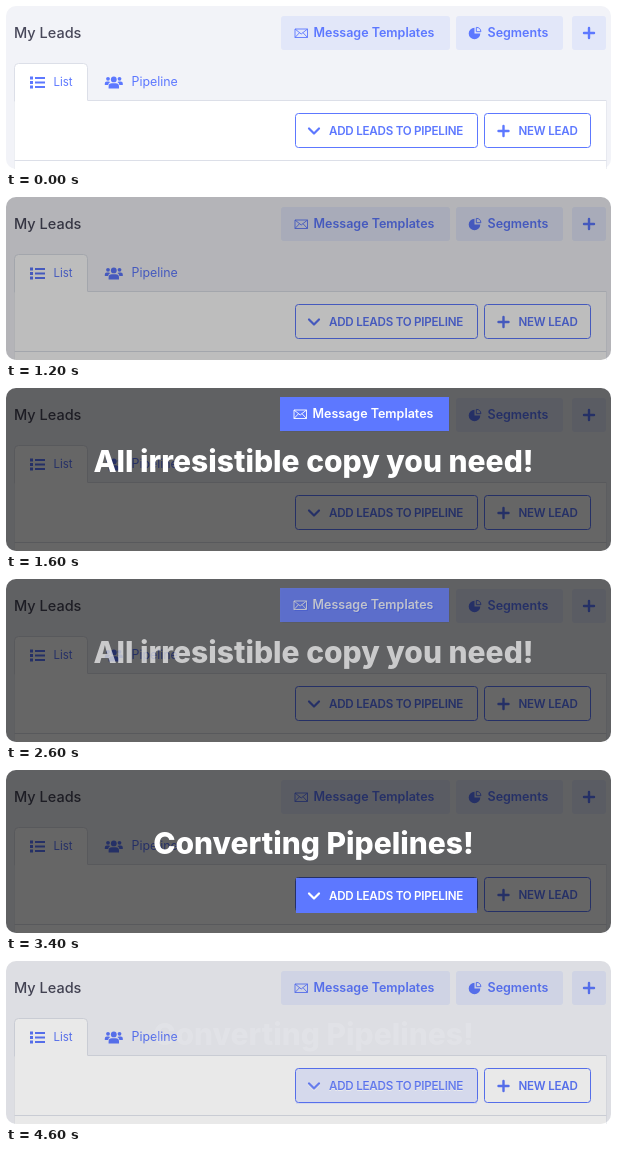
An HTML page for the animation above (4.7 s loop, 605 by 163 pixels).

```html
<!DOCTYPE html>
<html lang="en">
<head>
<meta charset="utf-8">
<title>My Leads</title>
<style>
  html, body { margin: 0; width: 100%; height: 100%; overflow: hidden; background: #fff; }
  svg { display: block; width: 605px; height: 163px; color: #5d78ff; }
  text {
    font-family: Inter, "Open Sans", sans-serif;
    font-optical-sizing: none;
    fill: currentColor;
  }
  .label { font-size: 12.5px; font-weight: 600; }
  .caps { font-size: 11.6px; font-weight: 600; letter-spacing: -.23px; }
  .headline { font-size: 30px; font-weight: 800; text-anchor: middle; fill: #fff; }
  .soft { fill: #e2e7f9; }
  .solid { fill: currentColor; }
  .line { fill: none; stroke: currentColor; }
  .edge { fill: none; stroke: #dcdfe8; }
</style>
</head>
<body>
<svg viewBox="0 0 605 163">
  <defs>
    <g id="templates">
      <path class="line" stroke-width=".9" d="M289 23h12.5v8.5h-12.5zl6.2 5 6.3-5M289 31.5l4.5-4.8M301.5 31.5l-4.5-4.8"/>
      <text class="label" x="307.5" y="31">Message Templates</text>
    </g>
    <g id="addLeads">
      <path class="line" stroke-width="2.2" stroke-linecap="round" stroke-linejoin="round" d="M303 122.5l5 5 5-5"/>
      <text class="caps" x="323" y="129">ADD LEADS TO PIPELINE</text>
    </g>
    <path id="plus" class="line" stroke-width="2.4" stroke-linecap="round" d="M-5 0h10M0-5v10"/>
  </defs>

  <rect width="605" height="163" rx="10" fill="#f2f3f8"/>
  <text x="8" y="32" font-size="14.5" font-weight="500" style="fill:#48485a">My Leads</text>

  <!-- Toolbar -->
  <rect class="soft" x="275" y="10" width="169" height="34" rx="3"/>
  <rect class="soft" x="450" y="10" width="107" height="34" rx="3"/>
  <rect class="soft" x="566" y="10" width="34" height="34" rx="3"/>
  <use href="#templates"/>
  <path class="solid" d="M468.5 27.5v-5.8a5.8 5.8 0 1 0 5.8 5.8z"/>
  <path class="line" d="M470.3 25.7v-4.3a4.6 4.6 0 0 1 4.6 4.3z"/>
  <text class="label" x="481.5" y="31">Segments</text>
  <use href="#plus" x="583" y="27"/>

  <!-- Tabs and panel -->
  <path fill="#fff" d="M8 95h592v68H8z"/>
  <path class="edge" d="M82 94.5h518.5M8.5 154.5h592" />
  <path class="edge" stroke-opacity=".5" d="M8.5 95v68M600.5 95v68"/>
  <path fill="#fff" stroke="#dcdfe8" d="M8.5 95.5v-34q0-4 4-4h65q4 0 4 4v33"/>
  <path fill="#fff" d="M9 94h72v2H9z"/>
  <path class="solid" d="M24 70.5h3v3h-3zm0 4.5h3v3h-3zm0 4.5h3v3h-3zM29 71h10v2H29zm0 4.5h10v2H29zm0 4.5h10v2H29z"/>
  <text x="47.5" y="80" font-size="11.5">List</text>
  <g class="solid">
    <circle cx="102" cy="72.8" r="1.9"/>
    <circle cx="113.5" cy="72.8" r="1.9"/>
    <circle cx="107.8" cy="73.4" r="2.9"/>
    <path d="M98.8 79v-1.5q0-2 2-2h1.8q1 0 1.6.6-1.8 1.2-2 2.9zM116.8 79v-1.5q0-2-2-2H113q-1 0-1.6.6 1.8 1.2 2 2.9zM102.6 82.5V80.500q0-3.300 3.300-3.300h3.800q3.300 0 3.300 3.300v2z"/>
  </g>
  <text x="125.500" y="80" font-size="12.4">Pipeline</text>

  <!-- Panel actions -->
  <rect class="line" x="289.5" y="107.5" width="182" height="34" rx="3"/>
  <rect class="line" x="478.5" y="107.5" width="106" height="34" rx="3"/>
  <use href="#addLeads"/>
  <use href="#plus" x="497.5" y="125"/>
  <text class="caps" x="512.500" y="129">NEW LEAD</text>

  <rect id="shade" width="605" height="163" rx="10" fill-opacity=".6"/>

  <g id="copyCallout" color="#fff">
    <rect x="274" y="9" width="169" height="34" fill="#5d78ff"/>
    <use href="#templates" x="-1" y="-1"/>
    <text class="headline" x="307.5" y="84">All irresistible copy you need!</text>
  </g>
  <g id="pipelineCallout" color="#fff">
    <rect x="290" y="108" width="181" height="35" fill="#5d78ff"/>
    <use href="#addLeads" y="1"/>
    <text class="headline" x="307.5" y="84">Converting Pipelines!</text>
  </g>
</svg>
<script>
  const LOOP = 4700, STEP = 100;
  const byId = id => document.getElementById(id);
  const shade = byId('shade'), copy = byId('copyCallout'), pipeline = byId('pipelineCallout');
  const clamp = v => Math.min(1, Math.max(0, v));

  // Fades advance in 100 ms steps; a ramp already shows 1/count on its first step.
  function render(now) {
    const step = Math.floor(now % LOOP / STEP);
    const ramp = (first, count) => clamp((step - first + 1) / count);
    const closing = 1 - ramp(44, 3.5);

    shade.style.opacity = ramp(10, 7) * closing;
    copy.style.opacity = step < 16 ? 0 : 1 - ramp(26, 3);
    pipeline.style.opacity = ramp(30, 5) * closing;
  }

  const start = performance.now();
  function tick() {
    render(performance.now() - start);
    requestAnimationFrame(tick);
  }
  tick();
</script>
</body>
</html>
```
